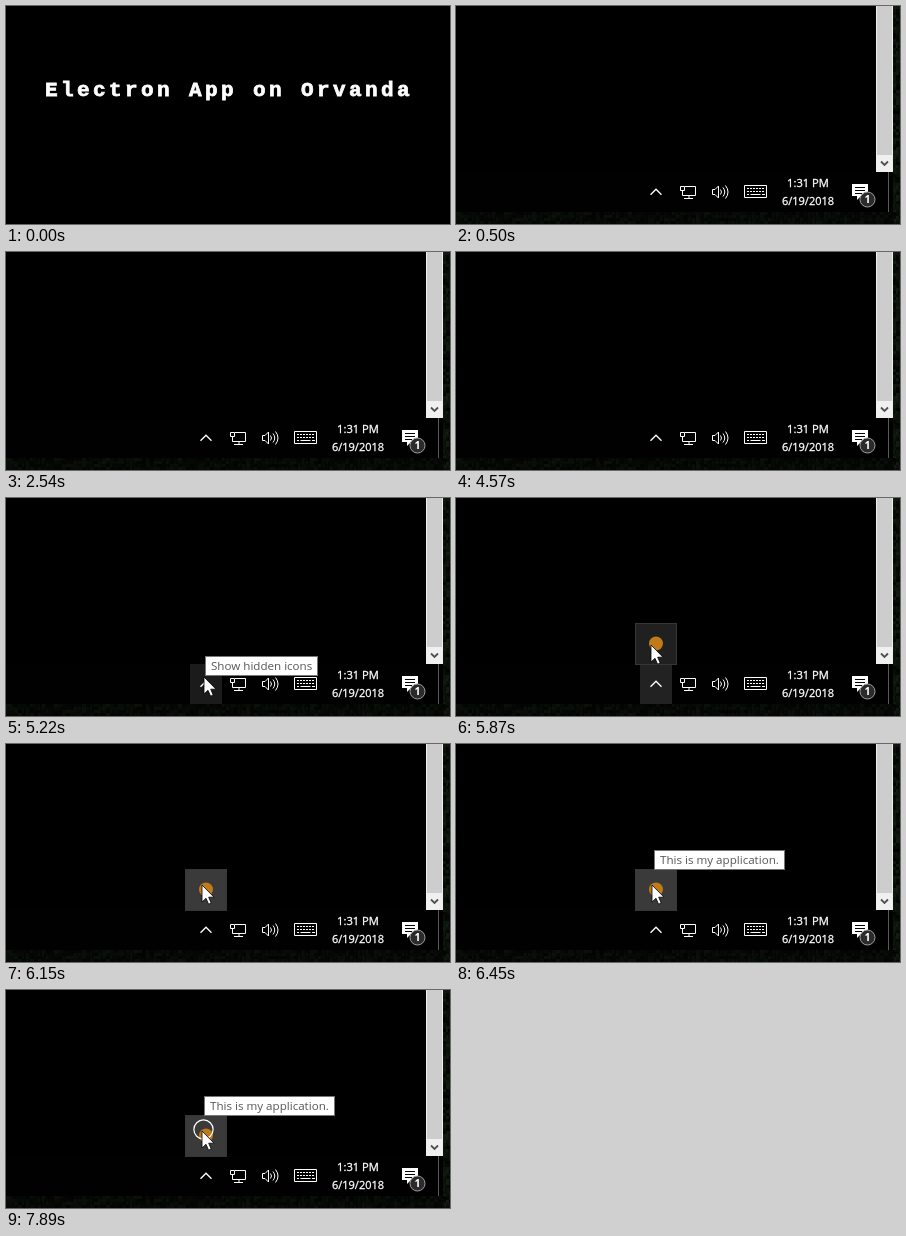
These frames come from a looping animation (444 by 218 pixels, 8000 ms). An HTML page:

```html
<!DOCTYPE html>
<html lang="en">
<head>
<meta charset="utf-8">
<title>Tray icon demo</title>
<style>
  html, body { margin: 0; width: 444px; height: 218px; overflow: hidden; background: #000; }
  svg { display: block; }
  text { font-family: "Open Sans", "Noto Sans", sans-serif; }
  .line { fill: none; stroke: #fff; }
  .clock { stroke: #fff; stroke-width: .3px; }
  .tip rect { fill: #fff; stroke: #767676; }
  .tip text { fill: #575757; font-size: 11.6px; }
  #title text {
    font: bold 21px "Liberation Mono", "DejaVu Sans Mono", monospace;
    letter-spacing: 3.4px; fill: #fff; stroke: #fff; stroke-width: .8px;
  }
</style>
</head>
<body>
<svg width="444" height="218" viewBox="0 0 444 218">
  <rect width="444" height="218" fill="#040604"/>
  <g id="wallpaper"></g>

  <!-- window and scrollbar -->
  <rect width="437" height="166"/>
  <rect x="420" width="17" height="166" fill="#f0f0f0"/>
  <rect x="421" width="15" height="149" fill="#cdcdcd"/>
  <path d="M425 155.5l3.5 3.5 3.5-3.5" fill="none" stroke="#505050" stroke-width="1.8"/>

  <!-- taskbar -->
  <rect y="166" width="437" height="40" fill="#010102"/>
  <path d="M432.5 166v40" stroke="#5a5a5a"/>
  <rect id="hover" x="184" y="166" width="32" height="40" fill="#fff"/>
  <path class="line" d="M194.5 188.7l5.5-5.5 5.5 5.5" stroke-width="1.3"/>
  <g class="line">
    <path d="M229 180.5h10.5v9h-13v-5M224.5 180.5h4v4h-4zM233 190v2M228 192.5h9"/>
    <path d="M256.5 183.5h2.5l3.5-3.5v12l-3.5-3.5h-2.5z"/>
    <path d="M264.5 183.5q2 2.5 0 5M267 181.5q3.5 4.5 0 9M269.5 179.5q5 6.5 0 13"/>
    <path d="M288.5 179.5h22v12h-22z"/>
    <path d="M291 182.5h18M291 185.5h18" stroke-dasharray="2 1"/>
    <path d="M291 188.5h2M294.5 188.5h10M306 188.5h3"/>
  </g>
  <g fill="#fff" text-anchor="middle">
    <text class="clock" x="352" y="181" font-size="11.2">1:31 PM</text>
    <text class="clock" x="352" y="199" font-size="11">6/19/2018</text>
    <path d="M396 178h16v12h-7l-4 4v-4h-5z"/>
    <path d="M399 181.5h10M399 184.5h10M399 187.5h7" stroke="#010102"/>
    <circle cx="411.5" cy="193.5" r="7.5" fill="#2b2b2b" stroke="#a0a0a0"/>
    <text x="411.5" y="197.3" font-size="10.5" font-weight="bold">1</text>
  </g>

  <!-- tray popup -->
  <g id="popup">
    <rect x="179.5" y="125.5" width="41" height="41" fill="#202020" stroke="#363636"/>
    <rect id="cell" x="180" y="126" width="40" height="40" fill="#3a3a3a"/>
    <circle cx="200" cy="145.5" r="7" fill="#c07a18"/>
  </g>
  <g id="trayTip" class="tip">
    <rect x="199.5" y="158.5" width="112" height="19"/>
    <text x="205" y="172">Show hidden icons</text>
  </g>
  <g id="appTip" class="tip">
    <rect x="198.5" y="106.5" width="130" height="19"/>
    <text x="204" y="120">This is my application.</text>
  </g>
  <circle id="ring" class="line" cx="197.5" cy="139.5" r="9.6" stroke-width="1.2"/>
  <path id="cursor" d="M0 0V17L4 13.3 6.6 19.2 9.2 18 6.7 12.2H12Z" fill="#fff" stroke="#000" stroke-width=".8"/>

  <g id="title">
    <rect width="444" height="218"/>
    <text x="39" y="89.5">Electron App on Orvanda</text>
  </g>
</svg>
<script>
const LOOP = 8000;
const changes = [0, 500, 2540, 4570, 4630, 4750, 5110, 5170, 5220, 5280, 5400,
  5750, 5810, 5870, 5930, 5990, 6050, 6100, 6150, 6450, 7890];
const el = id => document.getElementById(id);
const ramp = (t, a, b) => Math.min(1, Math.max(0, (t - a) / (b - a)));
const fade = (id, value) => el(id).setAttribute("opacity", Number(value));

// dark foliage around the screen
let seed = 7;
const random = () => (seed = seed * 16807 % 2147483647) / 2147483647;
let leaves = "";
const leaf = (x, y, light) => {
  const color = `hsl(${90 + random() * 40} 28% ${1 + random() * light}%)`;
  leaves += `<rect x="${x}" y="${y}" width="${2 + random() * 3}" height="3" fill="${color}"/>`;
};
for (let y = 0; y < 218; y += 3) for (let x = 437; x < 444; x += 3) leaf(x, y, 8);
for (let y = 206; y < 218; y += 3) for (let x = 0; x < 437; x += 4) leaf(x, y, 4);
el("wallpaper").innerHTML = leaves;

function draw(now) {
  const time = now % LOOP;
  const t = changes.findLast(c => c <= time);
  const rise = ramp(t, 5690, 5870), settle = ramp(t, 5870, 6150);

  fade("title", t < 500);
  fade("hover", .1 * ramp(t, 4570, 4750) + .03 * ramp(t, 5220, 5400) - .13 * ramp(t, 5870, 6050));
  fade("trayTip", t < 5280 ? ramp(t, 5060, 5220) : 0);
  fade("popup", ramp(t, 5220, 5400));
  fade("cell", settle);
  fade("appTip", t >= 6450);
  fade("ring", t >= 7890);
  fade("cursor", t >= 4630);
  el("cursor").setAttribute("transform",
    `translate(${198 - 3 * rise + settle} ${179 - 32 * rise - 6 * settle})`);
  requestAnimationFrame(() => draw(performance.now() - start));
}
const start = performance.now();
draw(0);
</script>
</body>
</html>
```
